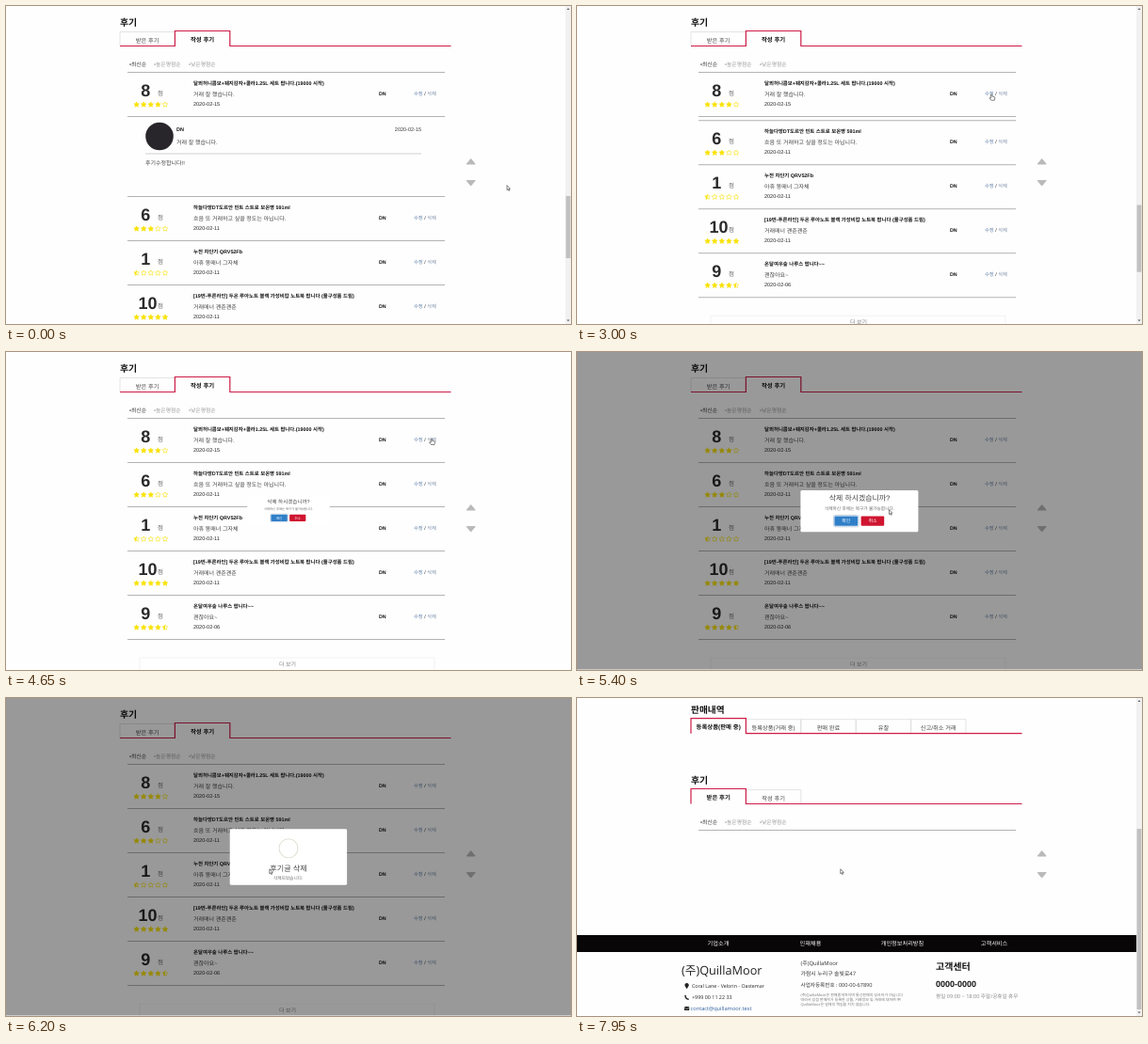
Write an HTML page that moves like this. It is 600x338 px and loops after 8 s.

```html
<!DOCTYPE html>
<html lang="ko">
<head>
<meta charset="utf-8">
<title>후기</title>
<style>
html, body { margin: 0; width: 100%; height: 100%; overflow: hidden; background: #fefefe; }
svg { display: block; width: 100%; height: 100%; }
text {
  font-family: "Liberation Sans", "Noto Sans CJK KR", "Noto Sans CJK", sans-serif;
  text-rendering: geometricPrecision;
  white-space: pre;
}
.soft { font-family: "Open Sans", "Noto Sans CJK KR", "Noto Sans CJK", sans-serif; }
</style>
</head>
<body>
<svg id="stage" viewBox="0 0 600 338"></svg>
<script>
const LOOP = 8000, STEP = 50;
const RED = '#cd1c48', LINE = '#b3b3b3', YELLOW = '#f8e208';
const stage = document.getElementById('stage');

function el(parent, tag, attrs = {}) {
  const node = document.createElementNS('http://www.w3.org/2000/svg', tag);
  for (const k in attrs) node.setAttribute(k, attrs[k]);
  return parent.appendChild(node);
}
const group = (p, attrs) => el(p, 'g', attrs);
const rect = (p, x, y, width, height, fill, more) =>
  el(p, 'rect', { x, y, width, height, fill, ...more });
const path = (p, d, more) => el(p, 'path', { d, fill: 'none', ...more });
const rule = (p, x1, x2, y, color = LINE) => rect(p, x1, y - .5, x2 - x1, 1, color);

function text(p, x, y, str, size, fill = '#333', more = {}) {
  const t = el(p, 'text', { x, y, 'font-size': size, fill, ...more });
  t.textContent = str;
  return t;
}
const BOLD = { 'font-weight': 700 }, MID = { 'text-anchor': 'middle' };
const bold = (p, x, y, str, size, fill = '#111', more = {}) =>
  text(p, x, y, str, size, fill, { ...BOLD, ...more });

// ---- page parts ----
function tabs(p, top, labels, active) {
  const x0 = 121, w = 58.4, base = top + 16;
  labels.forEach((label, i) => {
    const x = x0 + i * w, on = i === active;
    if (!on) path(p, `M${x} ${base}V${top + 1}H${x + w}V${base}`, { stroke: '#dadada', 'stroke-width': .7 });
    text(p, x + w / 2, top + (on ? 11 : 12.2), label, on ? 6.4 : 6.25, on ? '#111' : '#444',
      on ? { ...BOLD, ...MID } : MID);
  });
  const a = x0 + active * w;
  path(p, `M${x0} ${base}H${a}V${top}H${a + w}V${base}H472.5`, { stroke: RED, 'stroke-width': 1.2 });
}

function reviewHead(p, top, active) {
  bold(p, 121, top - 5.7, '후기', 9.9);
  tabs(p, top, ['받은 후기', '작성 후기'], active);
  text(p, 131, top + 37.6, '•최신순', 5.8, '#333');
  text(p, 157, top + 37.6, '•높은평점순', 5.8, '#999');
  text(p, 194, top + 37.6, '•낮은평점순', 5.8, '#999');
  rule(p, 129, 466, top + 44);
}

function starPath(cx, cy, from = 0) {
  const pts = [];
  for (let k = from; k < 10 + (from ? 1 : 0); k++) {
    const a = (k * 36 - 90) * Math.PI / 180, r = k % 2 ? 1.45 : 2.95;
    pts.push((cx + r * Math.cos(a)).toFixed(2) + ' ' + (cy + r * Math.sin(a)).toFixed(2));
  }
  return 'M' + pts.join('L') + 'Z';
}

function stars(p, y, score) {
  for (let i = 0; i < 5; i++) {
    const x = 138.6 + i * 7.6, left = score / 2 - i;
    path(p, starPath(x, y), { stroke: YELLOW, 'stroke-width': .6, fill: left >= 1 ? YELLOW : 'none' });
    if (left === .5) path(p, starPath(x, y, 5), { fill: YELLOW });
  }
}

function row(p, y, [score, title, note, date]) {
  bold(p, score > 9 ? 150.4 : 148.2, y + 25.5, score, 18, '#2a2a2a', MID);
  text(p, 161, y + 24.2, '점', 6.5, '#666');
  stars(p, y + 34.3, score);
  bold(p, 199, y + 13.4, title, 5.4);
  text(p, 199, y + 25.4, note, 6, '#444');
  text(p, 199, y + 35.6, date, 5.5, '#222');
  bold(p, 396, y + 24.1, 'DN', 5.3);
  const links = text(p, 433, y + 24.1, '', 5.3);
  [['수정', '#5f7fa8'], [' / ', '#222'], ['삭제', '#7b8ea8']].forEach(([s, fill]) => {
    el(links, 'tspan', { fill }).textContent = s;
  });
  rule(p, 129, 466, y + ROW);
}

const reviews = [
  [8, '달뫼허니콤보+웨지감자+콜라1.25L 세트 팝니다.(19000 시작)', '거래 잘 했습니다.', '2020-02-15'],
  [6, '하늘다방DT도르안 민트 스트로 보온병 591ml', '흐음 또 거래하고 싶을 정도는 아닙니다.', '2020-02-11'],
  [1, '누전 차단기 QRV52Fb', '아휴 똥매너 그자체', '2020-02-11'],
  [10, '[19번-푸른라인] 두온 루아노트 블랙 가성비캅 노트북 팝니다 (풀구성품 드림)', '거래매너 괜춘괜춘', '2020-02-11'],
  [9, '온달여우숲 나루스 팝니다~~', '괜찮아요~', '2020-02-06']
];

// ---- written reviews page ----
const TOP = 70.5, ROW = 47, DETAIL = 85;
const listPage = group(stage);
reviewHead(listPage, 26.5, 1);
row(listPage, TOP, reviews[0]);

const clip = el(el(stage, 'clipPath', { id: 'fold' }), 'rect', { x: 0, y: 118, width: 600, height: DETAIL });
const detail = group(listPage, { 'clip-path': 'url(#fold)' });
el(detail, 'circle', { cx: 163, cy: 138.5, r: 14.8, fill: '#29262b' });
bold(detail, 181, 132.7, 'DN', 5.5);
text(detail, 441, 132.7, '2020-02-15', 5.5, '#333', { 'text-anchor': 'end' });
text(detail, 181, 147.2, '거래 잘 했습니다.', 6, '#444');
rule(detail, 148, 441, 157, '#d2d2d2');
text(detail, 148, 169, '후기수정합니다!!', 6, '#444');

const rest = group(listPage);
rule(rest, 129, 466, TOP + ROW);
reviews.slice(1).forEach((r, i) => row(rest, TOP + ROW * (i + 1), r));
rect(rest, 142, 325, 313, 18, 'none', { stroke: '#eeeeee', 'stroke-width': .7 });
text(rest, 299, 334.2, '더 보기', 6, '#888', MID);

// ---- received reviews page ----
const endPage = group(stage);
bold(endPage, 121, 16.2, '판매내역', 9.7);
tabs(endPage, 21.7, ['등록상품(판매 중)', '등록상품(거래 중)', '판매 완료', '유찰', '신고/취소 거래'], 0);
reviewHead(endPage, 96.5, 0);
rect(endPage, 0, 252, 594, 18, '#080606');
[[150, '기업소개'], [248, '인재채용'], [345.5, '개인정보처리방침'], [443, '고객서비스']]
  .forEach(([x, s]) => text(endPage, x, 263, s, 6.2, '#fff', MID));

const SOFT = { class: 'soft' };
const foot = (x, y, s, size, fill, more) => text(endPage, x, y, s, size, fill, { ...SOFT, ...more });
foot(111, 294, '(주)QuillaMoor', 12.7, '#222');
foot(122, 308.2, 'Coral Lane - Velorin - Oastemar', 5.3, '#222');
foot(122, 320, '+999 00 11 22 33', 5.4, '#222');
foot(120.5, 331.8, 'contact@quillamoor.test', 5.7, '#2f62a0');
path(endPage, 'M116.6 309.2L114.6 306A2.2 2.2 0 1 1 118.6 306Z', { fill: '#222' });
path(endPage, 'M115 315.8Q114.9 320 118.7 320.2', { stroke: '#222', 'stroke-width': 1.4 });
rect(endPage, 114, 328, 5.2, 4, '#222', { rx: .5 });
path(endPage, 'M114 328.8L116.6 330.6L119.2 328.8', { stroke: '#fff', 'stroke-width': .5 });
foot(237.5, 284, '(주)QuillaMoor', 5.9, '#333');
foot(237.5, 295.3, '가람시 누리구 솔빛로47', 5.9, '#333');
foot(237.5, 307, '사업자등록번호 : 000-00-67890', 5.6, '#333');
['(주)QuillaMoor은 판매중개자이며 통신판매의 당사자가 아닙니다',
  '따라서 입점 판매자가 등록한 상품, 거래정보 및 거래에 대하여 ㈜',
  'QuillaMoor은 일체의 책임을 지지 않습니다.']
  .forEach((s, i) => foot(237.5, 317 + i * 5.1, s, 4, '#777'));
bold(endPage, 381, 289.4, '고객센터', 10);
bold(endPage, 381, 306.6, '0000-0000', 9);
foot(381, 319.4, '평일 09:00 ~ 18:00 주말/공휴일 휴무', 5.6, '#888');

// ---- floating arrows and scrollbar ----
[[168, 162.6], [185.6, 191]].forEach(([base, tip]) =>
  path(stage, `M489.2 ${base}H498.2L493.7 ${tip}Z`,
    { fill: '#b9b9b9', stroke: '#b9b9b9', 'stroke-width': 1, 'stroke-linejoin': 'round' }));

const bar = group(stage);
rect(bar, 594, 0, 6, 338, '#f1f1f1');
path(bar, 'M595.5 4L597 2.3L598.5 4Z', { fill: '#555' });
path(bar, 'M595.5 333.5L597 335.2L598.5 333.5Z', { fill: '#555' });
const thumb = rect(bar, 594.6, 202, 4.8, 66, '#c1c1c1');

// ---- dialogs ----
const shade = rect(stage, 0, 0, 600, 337.5, '#000');

function dialog(y, h) {
  const g = group(stage);
  rect(g, 237.4, y, 125, h, '#fff', { rx: 1.5 });
  return g;
}
const TITLE = { ...MID, 'font-weight': 500 };
const ask = dialog(147, 44.2);
text(ask, 300, 158.2, '삭제 하시겠습니까?', 7.9, '#444', TITLE);
text(ask, 300, 167.5, '삭제하신 후에는 복구가 불가능합니다.', 4.7, '#666', MID);
rect(ask, 272.4, 173.4, 26.8, 12.4, 'none', { rx: 1.8, stroke: '#a9bdd2', 'stroke-width': .7 });
rect(ask, 273.4, 174.4, 24.8, 10.4, '#2f7fc8', { rx: 1 });
rect(ask, 301.6, 174.4, 24.6, 10.4, '#cf1530', { rx: 1 });
text(ask, 285.8, 181.4, '확인', 4.9, '#fff', MID);
text(ask, 313.9, 181.4, '취소', 4.9, '#fff', MID);

const done = dialog(139, 60);
el(done, 'circle', { cx: 300, cy: 159.7, r: 10, fill: 'none', stroke: '#e4e1d8', 'stroke-width': 1.1 });
const check = path(done, 'M294.6 160L298.4 163.8L305.8 155.6',
  { stroke: '#aaa68c', 'stroke-width': 1.4, pathLength: 1, 'stroke-dasharray': '1 2' });
text(done, 300, 184, '후기글 삭제', 8.1, '#444', TITLE);
text(done, 299.6, 193.2, '삭제되었습니다.', 4.7, '#666', MID);

// ---- pointer ----
const pointer = group(stage);
const INK = { fill: '#fff', stroke: '#333', 'stroke-width': .6 };
const arrow = path(pointer, 'M0 .6V5.6L1.1 4.6L1.9 6.4L2.7 6L2 4.3H3.4Z', INK);
const hand = path(pointer,
  'M-.7 1.1Q0 .2 .6 1.1V3.1L3 3.7Q3.7 4 3.5 4.8L3 7.2H-.5L-2.4 4.7Q-2 3.8 -.7 4.8Z', INK);

// ---- motion ----
const clamp = v => Math.max(0, Math.min(1, v));
const span = (t, a, b) => clamp((t - a) / (b - a));
const swing = v => .5 - Math.cos(v * Math.PI) / 2;
const mix = (a, b, v) => a + (b - a) * v;
const show = (node, on) => node.setAttribute('display', on ? 'inline' : 'none');

const track = [
  [0, 532, 190], [200, 541, 188], [850, 463, 120], [1300, 440.3, 93], [3500, 440.3, 93],
  [4000, 452, 91.3], [5100, 452, 91.3], [5400, 331.5, 167], [5700, 279.8, 181.2], [LOOP, 279.8, 181.2]
];
function pointerAt(t) {
  const i = Math.max(1, track.findIndex(k => k[0] >= t));
  const [a, x1, y1] = track[i - 1], [b, x2, y2] = track[i];
  const v = swing(span(t, a, b));
  return [mix(x1, x2, v), mix(y1, y2, v)];
}

const pop = [[0, .7], [.45, 1.05], [.8, .95], [1, 1]];
function popScale(v) {
  const i = Math.max(1, pop.findIndex(k => k[0] >= v));
  return mix(pop[i - 1][1], pop[i][1], swing(span(v, pop[i - 1][0], pop[i][0])));
}

// Poses one dialog and returns how dark its backdrop is.
function pose(node, t, open, close) {
  const on = t >= open && t < close + 150;
  show(node, on);
  if (!on) return 0;
  const out = span(t, close, close + 150);
  const s = out ? mix(1, .5, out) : popScale(span(t, open, open + 300));
  node.setAttribute('transform', `translate(300 169) scale(${s}) translate(-300 -169)`);
  node.setAttribute('opacity', 1 - out);
  return span(t, open, open + 100) * (1 - span(t, close, close + 100));
}

function render(t) {
  const ended = t >= 7850;
  show(listPage, !ended);
  show(endPage, ended);

  const fold = swing(span(t, 2700, 3050)), h = DETAIL * (1 - fold);
  clip.setAttribute('height', h);
  rest.setAttribute('transform', `translate(0 ${h})`);

  show(bar, t < 4650 || t >= 7800);
  thumb.setAttribute('y', ended ? 139 : mix(202, 212, fold));
  thumb.setAttribute('height', ended ? 192 : mix(66, 71.5, fold));

  const dark = pose(ask, t, 4650, 5950) + pose(done, t, 6100, 7650);
  shade.setAttribute('opacity', .4 * dark);
  check.setAttribute('stroke-dashoffset', 1 - span(t, 6500, 6800));
  show(check, t > 6500);

  const [x, y] = pointerAt(t);
  pointer.setAttribute('transform', `translate(${x} ${y})`);
  const linked = (t >= 1250 && t < 4700) || (t >= 5650 && t < 6000);
  show(hand, linked);
  show(arrow, !linked);
}

const start = performance.now();
function tick() {
  const t = (performance.now() - start) % LOOP;
  render(Math.floor(t / STEP) * STEP);
  requestAnimationFrame(tick);
}
tick();
</script>
</body>
</html>
```
